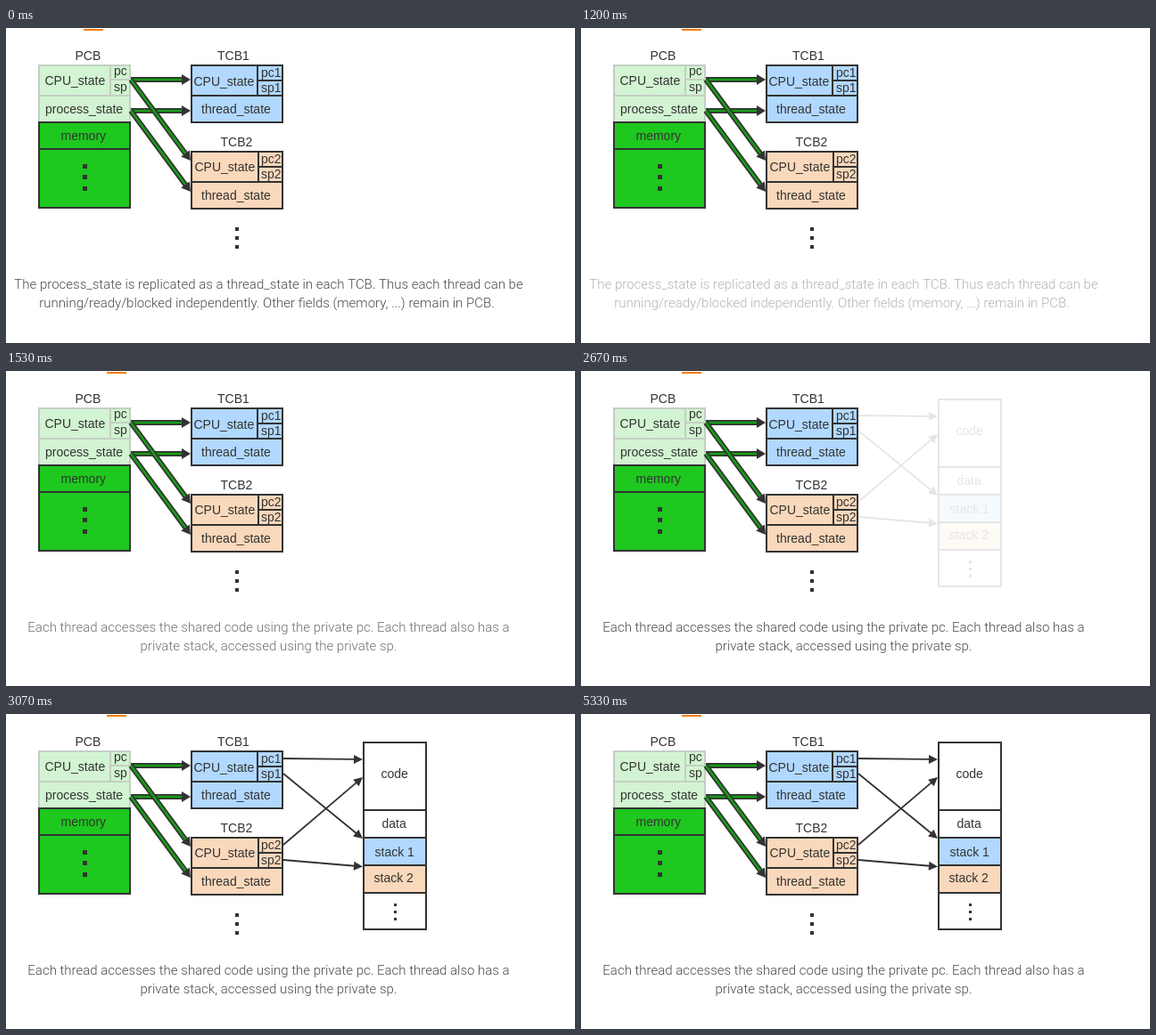
An HTML page with a canvas for the animation above (5.87 s loop, 638x354 px).

```html
<!DOCTYPE html>
<html lang="en">
<head>
<meta charset="utf-8">
<title>Process and thread control blocks</title>
<style>
html, body { margin: 0; width: 100%; height: 100%; overflow: hidden; background: #fff; }
canvas { position: absolute; left: 0; top: 0; width: 638px; height: 354px; }
</style>
</head>
<body>
<canvas id="base" width="638" height="354"></canvas>
<canvas id="space" width="638" height="354"></canvas>
<canvas id="top" width="638" height="354"></canvas>
<script>
const LOOP = 5870;
const INK = '#333', GREEN = '#1ec81e', BLUE = '#b1d8ff', PEACH = '#fad8bb';
const LABEL = '14px "Liberation Sans", Arial, sans-serif';
const CAPTION = '300 15px Roboto, sans-serif';

const [base, space, top2d] = ['base', 'space', 'top'].map(
  id => document.getElementById(id).getContext('2d'));

function label(c, text, x, y) {
  c.font = LABEL;
  c.fillStyle = INK;
  c.fillText(text, x, y);
}

function box(c, x, y, w, h, fill, stroke = INK) {
  c.fillStyle = fill;
  c.fillRect(x, y, w, h);
  c.strokeStyle = stroke;
  c.lineWidth = 2;
  c.strokeRect(x, y, w, h);
}

function line(c, x1, y1, x2, y2, width, color) {
  c.strokeStyle = color;
  c.lineWidth = width;
  c.beginPath();
  c.moveTo(x1, y1);
  c.lineTo(x2, y2);
  c.stroke();
}

function dots(c, x, ys, size) {
  c.fillStyle = INK;
  for (const y of ys) c.fillRect(x - size / 2, y - size / 2, size, size);
}

function head(c, x1, y1, x2, y2, length, half) {
  c.save();
  c.translate(x2, y2);
  c.rotate(Math.atan2(y2 - y1, x2 - x1));
  c.fillStyle = INK;
  c.beginPath();
  c.moveTo(0, 0);
  c.lineTo(-length, -half);
  c.lineTo(-length, half);
  c.fill();
  c.restore();
}

function arrow(c, x1, y1, x2, y2, thick) {
  const len = Math.hypot(x2 - x1, y2 - y1);
  const k = (len - 9) / len;
  const ex = x1 + (x2 - x1) * k, ey = y1 + (y2 - y1) * k;
  line(c, x1, y1, ex, ey, thick ? 6 : 1.8, INK);
  if (thick) line(c, x1, y1, ex, ey, 2.6, '#169c16');
  head(c, x1, y1, x2, y2, 10, thick ? 6 : 5);
}

function drawPcb(c) {
  const pale = '#d2f4d2', edge = '#c3cfc3';
  label(c, 'PCB', 77.5, 36);
  box(c, 37, 42, 102, 34, pale, edge);
  box(c, 37, 76, 102, 30, pale, edge);
  line(c, 117, 42, 117, 76, 2, edge);
  line(c, 117, 58, 139, 58, 2, edge);
  box(c, 37, 106, 102, 30, GREEN);
  box(c, 37, 136, 102, 66, GREEN);
  label(c, 'CPU_state', 43.5, 64);
  label(c, 'pc', 121, 53);
  label(c, 'sp', 121, 71);
  label(c, 'process_state', 44, 96);
  label(c, 'memory', 61.5, 126);
  dots(c, 88.5, [155.5, 167.5, 180.5], 5);
}

function drawTcb(c, n, y, split, fill) {
  const dx = n - 1;
  const cut = 282 + dx;
  label(c, 'TCB' + n, 237 + dx * 3.5, y - 6);
  box(c, 208, y, 102, 64, fill);
  line(c, 208, y + split, 310, y + split, 2, INK);
  line(c, cut, y, cut, y + split, 2, INK);
  line(c, cut, y + 17, 310, y + 17, 2, INK);
  label(c, 'CPU_state', 210.5 + dx, y + 23 - dx);
  label(c, 'pc' + n, 286, y + 13);
  label(c, 'sp' + n, 286, y + 30);
  label(c, 'thread_state', 219, y + 54);
}

function drawSpace(c) {
  box(c, 401, 32, 70, 76, '#fff');
  box(c, 401, 108, 70, 31, '#fff');
  box(c, 401, 139, 70, 31, BLUE);
  box(c, 401, 170, 70, 31, PEACH);
  box(c, 401, 201, 70, 41, '#fff');
  label(c, 'code', 420.5, 72);
  label(c, 'data', 421.5, 128);
  label(c, 'stack 1', 413.5, 160);
  label(c, 'stack 2', 412.5, 189);
  dots(c, 436.5, [214.5, 222.5, 230.5], 3);
  arrow(c, 311, 50, 400, 51);
  arrow(c, 311, 67, 400, 140);
  arrow(c, 311, 147, 400, 71);
  arrow(c, 311, 164, 400, 171.5);
}

drawPcb(base);
drawTcb(base, 1, 42, 34, BLUE);
drawTcb(base, 2, 139, 34, PEACH);
dots(base, 259, [226, 236, 246], 4);
arrow(base, 140, 58, 207, 58, true);
arrow(base, 140, 93, 207, 93, true);
arrow(base, 140, 58, 207, 149, true);
arrow(base, 140, 93, 207, 184, true);
drawSpace(space);

const before = {
  x: 292.5, lead: 2,
  lines: ['The process_state is replicated as a thread_state in each TCB. Thus each thread can be',
          'running/ready/blocked independently. Other fields (memory, ...) remain in PCB.']
};
const after = {
  x: 294.5, lead: 0,
  lines: ['Each thread accesses the shared code using the private pc. Each thread also has a',
          'private stack, accessed using the private sp.']
};

function caption(c, { x, lead, lines }, alpha) {
  c.save();
  c.globalAlpha = alpha;
  c.font = CAPTION;
  c.fillStyle = '#4a4a4a';
  c.textAlign = 'center';
  c.fillText(lines[0], x + lead, 293);
  c.fillText(lines[1], x, 314);
  c.restore();
}

const ramp = (t, a, b) => Math.min(1, Math.max(0, (t - a) / (b - a)));
const swing = p => (1 - Math.cos(Math.PI * p)) / 2;

// The picture advances in steps of a fifteenth of a second during fades.
function stepped(t, start, count) {
  if (t < start) return 0;
  const n = Math.min(count - 1, Math.floor((t - start + 2) / (200 / 3)));
  return start + n * 200 / 3;
}

function render(t) {
  const c = top2d;
  c.clearRect(0, 0, 638, 354);
  c.fillStyle = '#f57c00';
  c.fillRect(t < 1070 ? 87 : 113, 1, 22, 2);

  const a = stepped(t, 1070, 8);
  const out = 1 - ramp(a, 1010, 1225);
  if (out > 0) caption(c, before, out);
  else caption(c, after, ramp(a, 1235, 1530));

  const b = stepped(t, 2670, 7);
  space.canvas.style.opacity = swing(ramp(b, 2560, 3050));
}

const t0 = performance.now();
function tick() {
  render((performance.now() - t0) % LOOP);
  requestAnimationFrame(tick);
}
tick();
</script>
</body>
</html>
```
